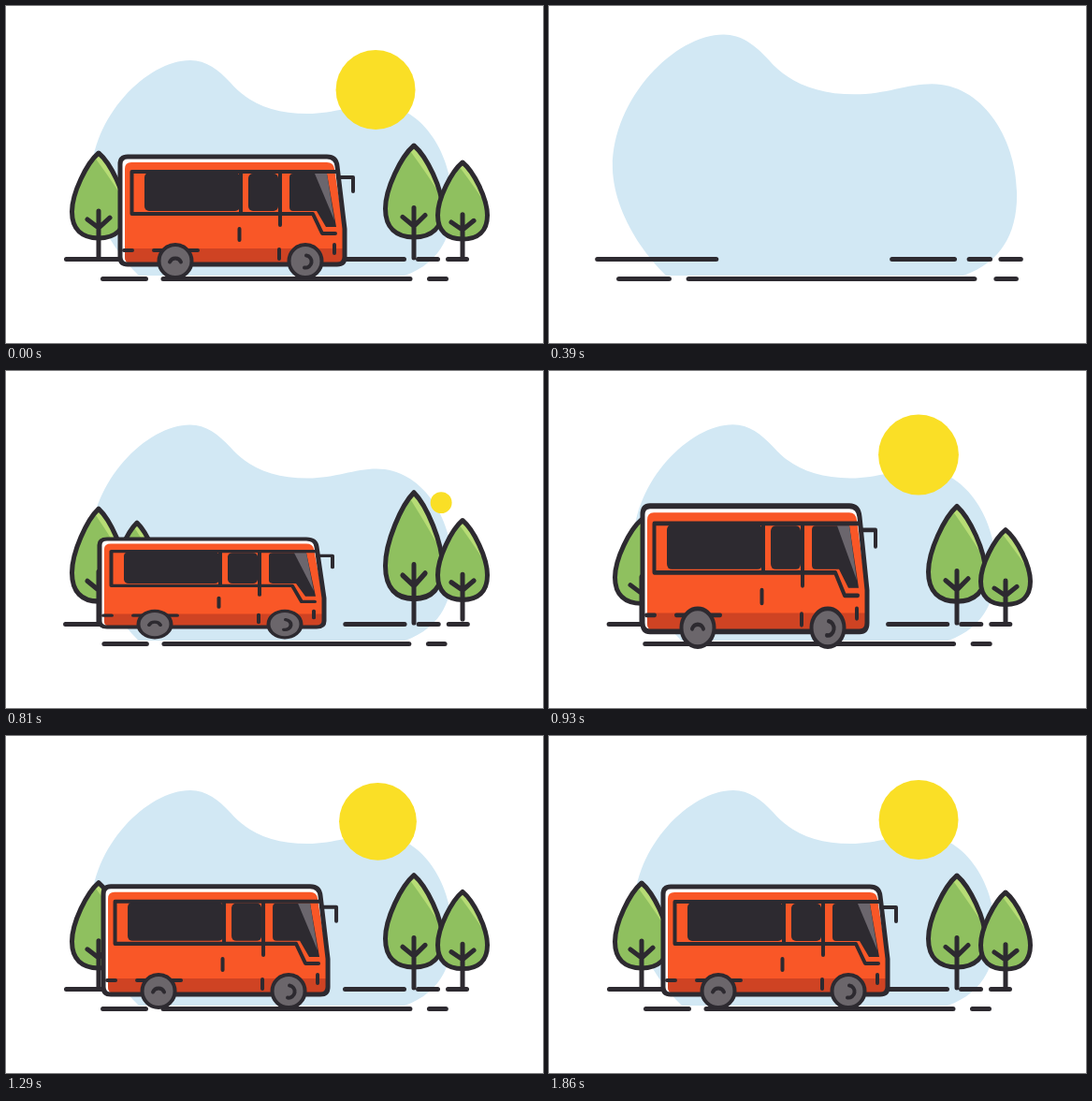
Write an HTML page that moves like this. It is 574 by 360 pixels and loops after 1.89 s.

```html
<!DOCTYPE html>
<html lang="en">
<head>
<meta charset="utf-8">
<title>Bus trip</title>
<style>
html, body { margin: 0; width: 100%; height: 100%; overflow: hidden; background: #fff; }
svg { display: block; width: 574px; height: 360px; }
.ink { fill: none; stroke: #2d2a30; stroke-width: 5; stroke-linecap: round; stroke-linejoin: round; }
.thin { stroke-width: 4; }
.glass { fill: #2d2a30; }
</style>
</head>
<body>
<svg viewBox="0 0 574 360">
  <path id="sky" fill="#d2e8f4" d="M142 288C115 262 92 222 91 186C90 120 150 58 197 58C214 58 227 68 240 82C258 103 285 115 322 115C352 115 372 105 396 105C443 105 476 155 477 208C478 246 463 275 426 288Z"/>
  <circle id="sun" r="42.5" fill="#fadf26"/>
  <path id="road" class="ink" d="M64.5 270.5H184.5M362.5 270.5H425.5M440.5 270.5H461.5M472.5 270.5H492.5"/>
  <path id="kerb" class="ink" d="M103.5 291.5H149.5M168 291.5H432M452.5 291.5H470.5"/>
  <g id="trees"></g>
  <g id="bus">
    <path fill="#fff" d="M130 161H343Q353 161 354 171L362 238V268Q362 276 354 276H130Q122 276 122 268V169Q122 161 130 161Z"/>
    <path fill="#f95727" d="M134 167H343Q350 167 351 174L361 238V268Q361 275 354 275H134Q127 275 127 268V174Q127 167 134 167Z"/>
    <path fill="#cf4323" d="M127 259H361V268Q361 275 354 275H134Q127 275 127 268Z"/>
    <rect class="glass" x="148" y="178" width="102" height="41" rx="5"/>
    <rect class="glass" x="259" y="179" width="32" height="40" rx="5"/>
    <path class="glass" d="M307 179H343L353 236H342L332 219H307Q303 219 303 215V183Q303 179 307 179Z"/>
    <path fill="#6b666d" d="M330 179H343L351 229Z"/>
    <g class="ink thin">
      <path d="M354 177H134.500V222H328L338 243H352M251 178V221M293 178V234M292 260V270M249.500 238V250M351 255V264M126 261H135M158 261H205"/>
      <path d="M355 183H371V198"/>
    </g>
    <path class="ink" d="M130 161H343Q353 161 354 171L362 238V268Q362 276 354 276H130Q122 276 122 268V169Q122 161 130 161Z"/>
    <g id="wheels"></g>
  </g>
</svg>
<script>
const LOOP = 1890;
const $ = id => document.getElementById(id);
const clamp = v => Math.min(1, Math.max(0, v));

// x, leaf top, leaf bottom, half width, start time, hop
const TREES = [
  [140, 167.5, 248, 24, 415, 0],
  [99, 157, 248, 28.5, 445, 0],
  [436, 149, 247, 30.5, 521, 0],
  [488, 167, 249, 26.5, 397, 118]
];

function treeMarkup([x, top, base, w], i) {
  const h = base - top;
  const px = k => (x + k * w).toFixed(1);
  const py = k => (base - k * h).toFixed(1);
  const right = `C${px(.45)} ${py(.88)} ${px(1)} ${py(.53)} ${px(1)} ${py(.31)}`;
  const leaf = `M${px(0)} ${py(1)}${right}C${px(1)} ${py(.1)} ${px(.62)} ${py(0)} ${px(0)} ${py(0)}` +
    `C${px(-.62)} ${py(0)} ${px(-1)} ${py(.1)} ${px(-1)} ${py(.31)}C${px(-1)} ${py(.53)} ${px(-.45)} ${py(.88)} ${px(0)} ${py(1)}Z`;
  const shine = `M${px(0)} ${py(1)}${right}L${px(1)} ${py(.42)}Q${px(.62)} ${py(.62)} ${px(-.1)} ${py(.93)}Z`;
  return `<g id="tree${i}"><path fill="#8fc05f" d="${leaf}"/><path fill="#b7dc75" d="${shine}"/><path class="ink" d="${leaf}"/>` +
    `<path class="ink" d="M${x} ${py(.32)}V269M${x - 12} ${py(.22)}L${x} ${py(.12)}L${x + 12} ${py(.24)}"/></g>`;
}

const wheelMarkup = (x, mark) =>
  `<g transform="translate(${x} 272.500)"><circle class="ink thin" r="17.500" style="fill:#6b666b"/><path class="ink thin" d="${mark}"/></g>`;

$('trees').innerHTML = TREES.map(treeMarkup).join('');
$('wheels').innerHTML = wheelMarkup(181, 'M-6 1A6.500 6.500 0 0 1 6 1') + wheelMarkup(320, 'M1 -6A6.500 6.500 0 0 1 -1 7');

// Damped spring from 0 to 1
function spring(time, speed = .0115, damp = .583) {
  if (time <= 0) return 0;
  const a = time * speed;
  return 1 - Math.exp(-damp * a) * (Math.cos(a) + damp * Math.sin(a));
}

function place(id, x, y, sx, sy, dx = 0, dy = 0) {
  const el = $(id);
  el.style.display = sx && sy ? '' : 'none';
  el.setAttribute('transform', `translate(${x + dx} ${y + dy}) scale(${sx} ${sy}) translate(${-x} ${-y})`);
}

function draw(time) {
  const t = time < 30 ? LOOP : time;

  place('road', 287, 270.5, spring(t), 1);
  place('kerb', 287, 291.5, spring(t - 135), 1);
  const sky = spring(t - 55);
  place('sky', 284, 288, sky, sky);

  const sun = spring(t - 746);
  const rise = 1 - Math.min(1, sun);
  place('sun', 0, 0, sun, sun, 395 + 96 * rise, 89.5 + 70 * rise);

  TREES.forEach(([x, , , , start, hop], i) => {
    const s = spring(t - start);
    place('tree' + i, x, 271, 1, s, 0, -hop * Math.max(0, s - 1));
  });

  const drive = clamp((t - 1110) / 660);
  const shift = -22 * (1 - drive * drive * (3 - 2 * drive));
  place('bus', 0, 262, 1, spring(t - 727, .0195, .453), shift);
}

const begin = performance.now();
function tick() {
  draw((performance.now() - begin) % LOOP);
  requestAnimationFrame(tick);
}
tick();
</script>
</body>
</html>
```
